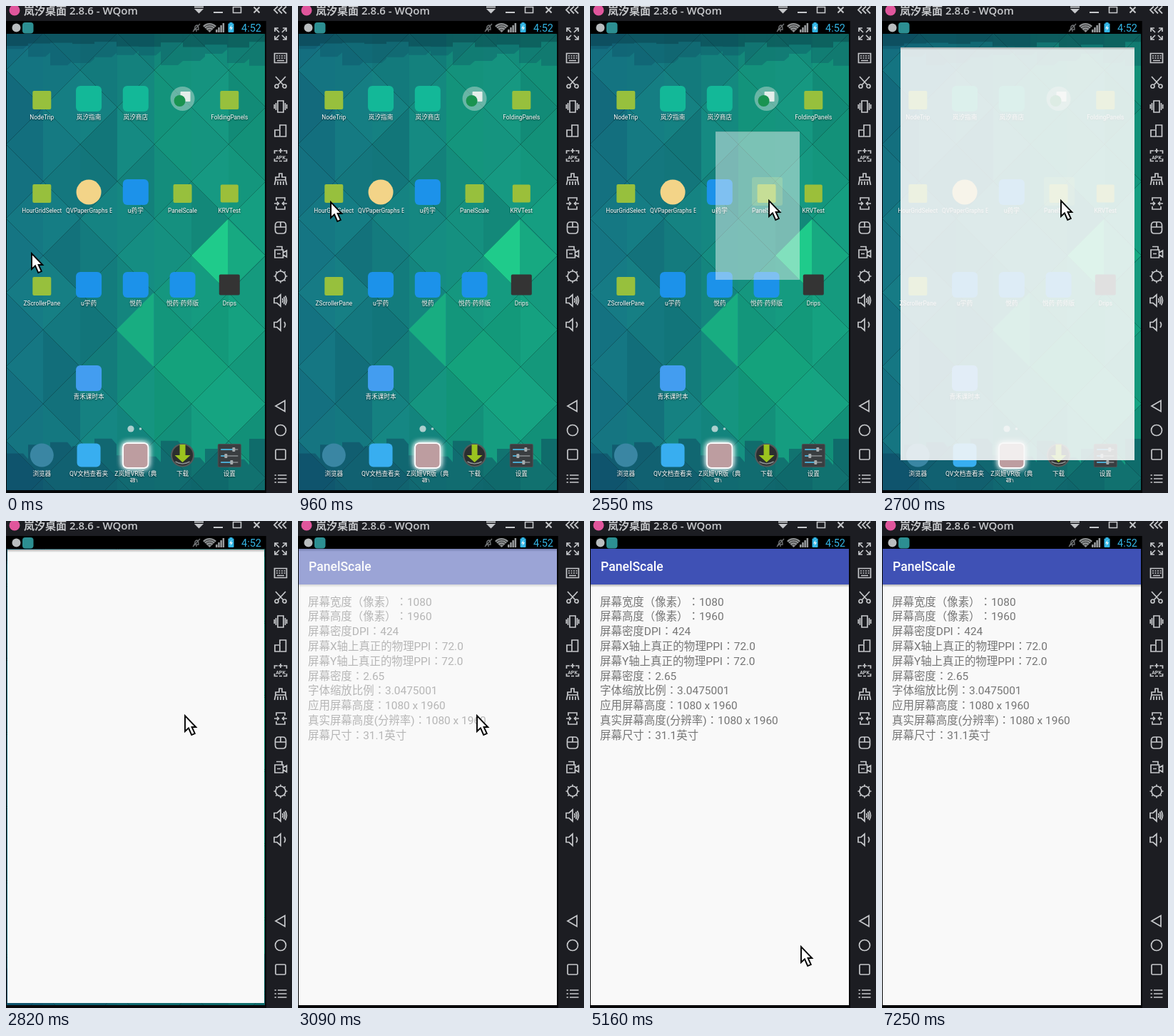
Write an HTML page with a canvas that moves like this. It is 401x683 px and loops after 8.12 s.

```html
<!DOCTYPE html>
<html lang="zh-CN">
<head>
<meta charset="utf-8">
<title>Launcher</title>
<style>
html, body { margin: 0; width: 100%; height: 100%; overflow: hidden; background: #1c1d22; }
canvas { display: block; }
</style>
</head>
<body>
<canvas id="stage" width="401" height="683"></canvas>
<script>
const LOOP = 8120, W = 401, H = 683;
const SCREEN = { x: 1, y: 39, w: 362, h: 640 };
const FONT = "Roboto, 'Noto Sans CJK SC', sans-serif";
const stage = document.getElementById('stage').getContext('2d');

// Pointer tip: time, x, y
const POINTER = [
  [0, 35, 346], [120, 33, 322], [240, 31, 301], [390, 31, 290], [510, 33, 286],
  [660, 39, 278], [810, 39, 277], [960, 45, 274], [1080, 53, 272], [1200, 66, 272],
  [1350, 120, 274], [1470, 190, 273], [1590, 244, 272], [1740, 251, 271], [1860, 250, 272],
  [3950, 250, 333], [4070, 254, 410], [4190, 258, 487], [4350, 260, 511], [4490, 262, 512],
  [4770, 263, 524], [4920, 267, 537], [5040, 279, 565], [5160, 295, 596],
  [5310, 317, 634], [5430, 335, 663], [5580, 340, 673], [5700, 500, 800]
];
// Opening window: time, scale, opacity
const OPENING = [[0, 0, 0], [2550, 0.325, 0.45], [2700, 0.905, 0.88], [2820, 0.994, 1], [2950, 1, 1]];
const CONTENT = [[0, 0], [3090, 0.5], [3210, 1]];

const INFO = [
  '屏幕宽度（像素）：1080', '屏幕高度（像素）：1960', '屏幕密度DPI：424',
  '屏幕X轴上真正的物理PPI：72.0', '屏幕Y轴上真正的物理PPI：72.0', '屏幕密度：2.65',
  '字体缩放比例：3.0475001', '应用屏幕高度：1080 x 1960',
  '真实屏幕高度(分辨率)：1080 x 1960', '屏幕尺寸：31.1英寸'
];

const LIME = '#97c03d', TEAL = '#13b898', BLUE = '#1c92ea';
// Column, row, label, shape, size, colour
const APPS = [
  [0, 0, 'NodeTrip', 'square', 26, LIME], [1, 0, '岚汐指南', 'square', 36, TEAL],
  [2, 0, '岚汐商店', 'square', 36, TEAL], [3, 0, '', 'folder', 34, '#3f9c86'],
  [4, 0, 'FoldingPanels', 'square', 26, LIME],
  [0, 1, 'HourGridSelect', 'square', 26, LIME], [1, 1, 'QVPaperGraphs Ex', 'circle', 35, '#f3d488'],
  [2, 1, 'u药学', 'square', 36, BLUE], [3, 1, 'PanelScale', 'square', 26, LIME],
  [4, 1, 'KRVTest', 'square', 25, '#9bbf3a'],
  [0, 2, 'ZScrollerPane', 'square', 26, LIME], [1, 2, 'u学药', 'square', 36, BLUE],
  [2, 2, '悦药', 'square', 36, BLUE], [3, 2, '悦药·药师版', 'square', 36, BLUE],
  [4, 2, 'Drips', 'square', 29, '#343434'],
  [1, 3, '青禾课时本', 'square', 36, '#439df0'],
  [0, 4, '浏览器', 'circle', 33, '#3a86a3'], [1, 4, 'QV文档查看夹', 'square', 33, '#38aef0'],
  [2, 4, 'Z岚姬VR版（典', 'none'], [3, 4, '下载', 'download'], [4, 4, '设置', 'sliders']
];
const ROWS = [130, 261, 391, 522, 630];
const colX = c => 50.3 + c * 65.75;

const noise = n => { const v = Math.sin(n * 127.1 + 3.7) * 43758.5453; return v - Math.floor(v); };
const at = (keys, t) => keys.reduce((cur, k) => (t >= k[0] ? k : cur));

function poly(g, pts, fill) {
  g.beginPath();
  pts.forEach(([x, y]) => g.lineTo(x, y));
  g.closePath();
  g.fillStyle = fill;
  g.fill();
}
function box(g, x, y, w, h, r, fill) {
  g.beginPath();
  g.roundRect(x, y, w, h, r);
  g.fillStyle = fill;
  g.fill();
}
function disc(g, x, y, r, fill) {
  g.beginPath();
  g.arc(x, y, r, 0, Math.PI * 2);
  g.fillStyle = fill;
  g.fill();
}
function text(g, str, x, y, font, fill, align = 'left') {
  g.font = font;
  g.fillStyle = fill;
  g.textAlign = align;
  g.fillText(str, x, y);
}
function strokePath(g, d, x, y, color, width) {
  g.save();
  g.translate(x, y);
  g.strokeStyle = color;
  g.lineWidth = width;
  g.stroke(new Path2D(d));
  g.restore();
}
function layer(paint) {
  const c = document.createElement('canvas');
  c.width = W;
  c.height = H;
  paint(c.getContext('2d'));
  return c;
}
function clipScreen(g) {
  g.beginPath();
  g.rect(SCREEN.x, SCREEN.y, SCREEN.w, SCREEN.h);
  g.clip();
}

// Lattice of 45° facets, blue on the left, green on the right, lit in two spots
function wallpaper(g) {
  const spot = (x, y, cx, cy, rx, ry) => Math.exp(-(((x - cx) / rx) ** 2) - ((y - cy) / ry) ** 2);
  const tone = (x, y, seed) => {
    const f = x / 363, d = (noise(seed) - 0.5) * 18;
    const lit = 26 * spot(x, y, 245, 510, 75, 110) + 16 * spot(x, y, 230, 150, 32, 110);
    return `rgb(${20 + d * 0.2},${110 + 42 * f + d + lit},${128 - 4 * f + d * 0.6})`;
  };
  for (let c = 0; c < 7; c++) {
    const x = c * 52, x2 = x + 52, off = c % 2 ? 38 : 90;
    for (let k = -1; k < 7; k++) {
      const y = off + k * 104;
      poly(g, [[x, y], [x, y + 104], [x2, y + 52]], tone(x + 17, y + 52, c * 17 + k));
      poly(g, [[x2, y - 52], [x2, y + 52], [x, y]], tone(x + 35, y, c * 31 + k + 9));
    }
  }
  poly(g, [[260, 350], [311, 299], [311, 401]], '#1fcb8b');
  poly(g, [[311, 299], [363, 350], [311, 401]], '#17a981');
  poly(g, [[155, 454], [207, 402], [207, 506]], '#18ad81');
  for (let i = 0; i < 12; i++) {
    const x = i * 31, a = noise(i + 50), b = noise(i + 80);
    const top = 54 + a * 26, base = 606 + b * 36;
    poly(g, [[x, 39], [x + 31, 39], [x + 31, top], [x + 24, top + 6], [x, top + 6]], 'rgba(12,66,92,.28)');
    poly(g, [[x, 39], [x + 31, 39], [x + 31, 50 + b * 10], [x, 50 + b * 10]], 'rgba(8,48,58,.35)');
    poly(g, [[x, base], [x + 24, base], [x + 31, base + 8], [x + 31, 680], [x, 680]], 'rgba(14,58,90,.42)');
  }
}

function label(g, str, x, y) {
  if (!str) return;
  const font = (/[\u4e00-\u9fff]/.test(str) ? 8.6 : 8.3) + 'px ' + FONT;
  g.save();
  g.shadowColor = 'rgba(0,0,0,.7)';
  g.shadowBlur = 2;
  g.shadowOffsetY = 1;
  g.font = font;
  const wide = g.measureText(str).width > 64;
  if (wide) {
    g.beginPath();
    g.rect(x - 32, y - 10, 64.5, 14);
    g.clip();
  }
  text(g, str, wide ? x - 32 : x, y, font, '#fff', wide ? 'left' : 'center');
  g.restore();
}

function appIcon(g, shape, x, y, size, color) {
  if (shape === 'square') {
    const drop = size < 28 ? 2 : 0;
    box(g, x - size / 2, y - size / 2 + drop, size, size, size > 30 ? 6 : 2, color);
  } else if (shape === 'circle') {
    disc(g, x, y, size / 2, color);
  } else if (shape === 'folder') {
    disc(g, x, y, 17, 'rgba(160,205,195,.6)');
    box(g, x - 3, y - 10, 14, 14, 1, '#e4eeea');
    disc(g, x - 4, y + 3, 8, '#1a9350');
  } else if (shape === 'download') {
    disc(g, x, y, 16.5, '#55595a');
    disc(g, x, y, 14.5, '#2b2e2f');
    poly(g, [[x - 4, y - 15], [x + 4, y - 15], [x + 4, y], [x + 11, y], [x, y + 10], [x - 11, y], [x - 4, y]], '#9bc41f');
    strokePath(g, 'M-10 9Q0 15 10 9', x, y, '#8a9090', 1.5);
  } else if (shape === 'sliders') {
    box(g, x - 16.5, y - 16, 33, 33, 2, '#4c5053');
    box(g, x - 15.5, y - 15, 31, 31, 1, '#3a3e41');
    [[-8, 6], [1, -5], [10, 3]].forEach(([dy, dx]) => {
      strokePath(g, 'M-12 0H12', x, y + dy, '#74797c', 2);
      strokePath(g, `M-12 0H${dx}`, x, y + dy, '#4aa8cf', 2);
      box(g, x + dx - 2, y + dy - 3, 4, 6, 1, '#a5abad');
    });
  }
}

const desktop = layer(g => {
  clipScreen(g);
  wallpaper(g);
  APPS.forEach(([c, r, name, shape, size, color]) => {
    appIcon(g, shape, colX(c), ROWS[r], size, color);
    label(g, name, colX(c), ROWS[r] + 29);
  });
  g.save();
  g.beginPath();
  g.rect(150, 655, 65, 13);
  g.clip();
  label(g, '藏）', colX(2), 670);
  g.restore();
  disc(g, 175, 593, 4.6, 'rgba(190,215,215,.9)');
  disc(g, 188.5, 593, 1.8, 'rgba(190,215,215,.9)');
});

const TOOLS = [
  [39, 'M-8-3V-8H-3M-8-8L-2-2M8-3V-8H3M8-8L2-2M-8 3V8H-3M-8 8L-2 2M8 3V8H3M8 8L2 2'],
  [73, 'M-8.5-6.5H8.5V6.5H-8.5ZM-6-3H-4M-2.5-3H-.5M1-3H3M4.5-3H6.5M-6 0H-4M-2.5 0H-.5M1 0H3M4.5 0H6.5M-5 3.5H5'],
  [107, 'M-7-8L4 4M7-8L-4 4M-3 5.5A2.5 2.5 0 1 1-8 5.5A2.5 2.5 0 1 1-3 5.5M8 5.5A2.5 2.5 0 1 1 3 5.5A2.5 2.5 0 1 1 8 5.5'],
  [141, 'M-4-8H4V8H-4ZM-6.5-5V5M6.5-5V5M-8.7-3V3M8.7-3V3'],
  [175, 'M-1-2V-8H7.5V8H0M-8-1H-1V8H-8Z'],
  [209, 'M-4-6H-8.5V-2M4-6H8.5V-2M-8.5 5V8.5H-4M-2 8.5H2M4 8.5H8.5V5M0-9V-3M-3-6H3'],
  [243, 'M-2-3V-8H2V-3H7V1H-7V-3ZM-7 1L-8.5 8M-4 3V8M0 3V8M4 3V8M7 1L8.5 8'],
  [277, 'M-6-4V-8H6V-4M-6 4V8H6V4M-9 0H-3M3 0H9M-5-2.5L-2.5 0L-5 2.5M5-2.5L2.5 0L5 2.5'],
  [311, 'M-3-8H3Q7.5-8 7.5-3V3Q7.5 8 3 8H-3Q-7.5 8-7.5 3V-3Q-7.5-8-3-8ZM-7.5-1H7.5M0-8V-1'],
  [345, 'M-8-3H3.5V8H-8ZM3.5 1L8.5-2V7L3.5 4M-6-7.5H2V-3M-5 2.5H0'],
  [379, 'M7 0A7 7 0 1 1-7 0A7 7 0 1 1 7 0M7 0H9.5M-7 0H-9.5M0 7V9.5M0-7V-9.5M5-5L6.7-6.7M-5-5L-6.7-6.7M5 5L6.7 6.7M-5 5L-6.7 6.7'],
  [413, 'M-9-3.5H-5L0-8V8L-5 3.5H-9ZM2.5-3Q4.5 0 2.5 3M4.5-5Q7.5 0 4.5 5M6.5-6.5Q10.5 0 6.5 6.5'],
  [447, 'M-9-3.5H-5L0-8V8L-5 3.5H-9ZM5-4Q8 0 5 4'],
  [561, 'M6-7.5V7.5L-7 0Z'],
  [595, 'M7.5 0A7.5 7.5 0 1 1-7.5 0A7.5 7.5 0 1 1 7.5 0'],
  [629, 'M-5.5-7H5.5Q7-7 7-5.5V5.5Q7 7 5.5 7H-5.5Q-7 7-7 5.5V-5.5Q-7-7-5.5-7Z'],
  [663, 'M-8.5-5H-6M-8.5 0H-6M-8.5 5H-6M-4-5H8.5M-4 0H8.5M-4 5H8.5']
];

const chrome = layer(g => {
  const ink = '#c6c8cb';
  g.fillStyle = '#1c1d22';
  g.fillRect(0, 0, W, 21);
  g.fillRect(365, 0, 36, H);
  g.fillStyle = '#07080a';
  g.fillRect(0, 21, 1, H);
  g.fillRect(363, 21, 2, H);
  g.fillRect(0, 679, 365, 4);
  g.fillStyle = '#000';
  g.fillRect(0, 21, 364, 18);

  disc(g, 12, 6, 7.5, '#e0569c');
  text(g, '岚汐桌面 2.8.6 - WQom', 25, 12, "600 15px 'Open Sans', 'Noto Sans CJK SC', sans-serif", ink);
  strokePath(g, 'M-6-3.5H7', 270, 5, ink, 2);
  poly(g, [[264, 4], [277, 4], [270.5, 10.5]], ink);
  strokePath(g, 'M-6 0H7', 297, 9, ink, 2);
  strokePath(g, 'M-5.5-3.5H5.5V4.5H-5.5Z', 324, 5, ink, 1.6);
  strokePath(g, 'M-4-4L4 4M4-4L-4 4', 351.5, 5.5, ink, 2);
  strokePath(g, 'M-4-5L-9 0L-4 5M2-5L-3 0L2 5M8-5L3 0L8 5', 385, 5.5, ink, 1.8);
  TOOLS.forEach(([y, d]) => strokePath(g, d, 385, y, ink, 1.7));
  text(g, 'APK', 385, 214.5, `700 7px ${FONT}`, ink, 'center');

  disc(g, 14.5, 30.5, 6, '#b9bdbf');
  box(g, 23, 23, 15.5, 15.5, 4, '#2c8f92');
  strokePath(g, 'M-3 2Q-2 1-2-2Q-1-4 1-4Q3-3 3 2ZM-1 4H1M-5 5L5-6', 267, 31, '#6f7274', 1.4);
  g.beginPath();
  g.moveTo(285.5, 37);
  g.arc(285.5, 37, 13, -Math.PI * 0.76, -Math.PI * 0.24);
  g.fillStyle = '#8e9193';
  g.fill();
  [4, 7.5, 10.5].forEach(r => {
    g.beginPath();
    g.arc(285.5, 37, r, -Math.PI * 0.76, -Math.PI * 0.24);
    g.strokeStyle = '#222';
    g.lineWidth = 0.9;
    g.stroke();
  });
  for (let i = 0; i < 4; i++) box(g, 294 + i * 3.2, 33 - i * 3, 2.5, 4 + i * 3, 0, '#9a9d9f');
  box(g, 311.5, 24.5, 8, 12.5, 1, '#33b5e5');
  box(g, 313.5, 23, 4, 2, 0, '#33b5e5');
  poly(g, [[316.5, 26.5], [313, 31.5], [315.3, 31.5], [314.5, 35], [318, 30], [315.8, 30]], '#e8f6fb');
  text(g, '4:52', 330, 36, `14.5px ${FONT}`, '#33b5e5');
});

function shade(g, x, y, w, h, alpha) {
  const s = g.createLinearGradient(0, y, 0, y + h);
  s.addColorStop(0, `rgba(0,0,0,${alpha})`);
  s.addColorStop(1, 'rgba(0,0,0,0)');
  g.fillStyle = s;
  g.fillRect(x, y, w, h);
}

// The TC face centres its full-width colon
function infoLine(g, line, x, y) {
  line.split(/(：)/).forEach(run => {
    const face = run === '：' ? "'Noto Sans CJK TC', sans-serif" : FONT;
    text(g, run, x, y, `15.45px ${face}`, '#757575');
    x += g.measureText(run).width;
  });
}

const appPage = layer(g => {
  const { x, y, w, h } = SCREEN;
  g.fillStyle = '#f9f9f9';
  g.fillRect(x, y, w, h);
  g.fillStyle = '#3f51b5';
  g.fillRect(x, y, w, 50);
  shade(g, x, 89, w, 4, 0.28);
  text(g, 'PanelScale', 15, 70, `500 17.6px ${FONT}`, '#fff');
  INFO.forEach((line, i) => infoLine(g, line, 14, 118.6 + i * 20.8));
});

// Dock icon with a gently pulsing halo
function glowIcon(g, t) {
  const pulse = t < 2700 ? Math.sin(Math.floor(t / 135) * 0.9) : 0;
  g.save();
  g.shadowColor = '#fff';
  g.shadowBlur = 9 + pulse;
  for (let i = 0; i < 2; i++) box(g, 163.5, 612.5, 36.5, 36, 6, '#fff');
  g.restore();
  box(g, 165, 614, 33.5, 33, 5, '#bd9da0');
}

// Window grows out of the tapped icon at (248, 261)
function opening(g, t) {
  const [, s, alpha] = at(OPENING, t);
  if (!s) return;
  const k = (s - 0.166) / 0.834;
  const w = Math.round(SCREEN.w * s), h = Math.round(SCREEN.h * s);
  const x = Math.round(248 - 66 * k - w / 2), y = Math.round(261 + 98 * k - h / 2);
  g.save();
  g.globalAlpha = alpha;
  g.fillStyle = '#f9f9f9';
  g.fillRect(x, y, w, h);
  shade(g, x, y, w, 4 * s, 0.3);
  g.restore();
}

function pointer(g, t) {
  const [, x, y] = at(POINTER, t);
  g.save();
  g.translate(x, y);
  const arrow = new Path2D('M1 1V23L6 18.3L10.2 28L14.8 26L10.6 17H16.3Z');
  g.fillStyle = '#fff';
  g.fill(arrow);
  g.strokeStyle = '#000';
  g.lineWidth = 1.9;
  g.stroke(arrow);
  g.restore();
}

function draw(t) {
  const g = stage;
  g.fillStyle = '#07080a';
  g.fillRect(0, 0, W, H);
  const content = at(CONTENT, t)[1];
  g.save();
  clipScreen(g);
  if (content < 1) {
    g.drawImage(desktop, 0, 0);
    glowIcon(g, t);
    if (t >= 2160) box(g, 227, 240, 43, 40, 3, 'rgba(170,220,90,.28)');
    opening(g, t);
  }
  g.globalAlpha = content;
  g.drawImage(appPage, 0, 0);
  g.restore();
  g.drawImage(chrome, 0, 0);
  if (t >= 6290 && t < 7250) poly(g, [[283, 30], [288, 30], [285.5, 34]], '#26292b');
  pointer(g, t);
}

const start = performance.now();
function tick() {
  draw((performance.now() - start) % LOOP);
  requestAnimationFrame(tick);
}
tick();
</script>
</body>
</html>
```
